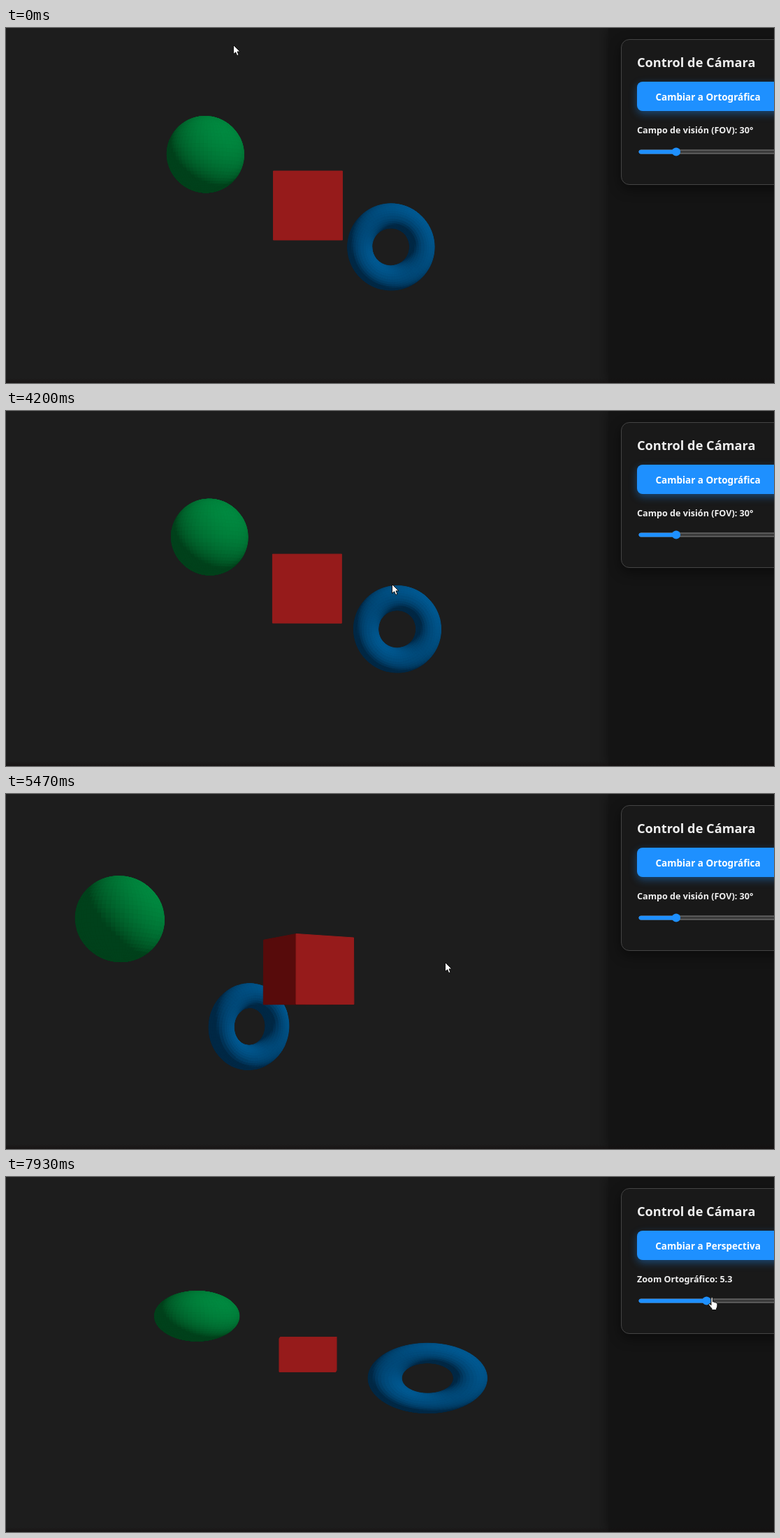
An HTML page with a canvas for the animation above (8000 ms loop, 1099x509 px).

```html
<!DOCTYPE html>
<html lang="es">
<head>
<meta charset="utf-8">
<title>Control de Cámara</title>
<style>
  html, body { margin: 0; width: 100%; height: 100%; overflow: hidden; background: #1d1d1d; }
  #stage { position: absolute; inset: 0; overflow: hidden; contain: strict; }
  #stage * { box-sizing: border-box; }
  #stage > * { position: absolute; }
  canvas, svg { left: 0; top: 0; }
  #edge { left: 0; right: 0; bottom: 0; height: 7px; background: linear-gradient(#0000, #150f0f99); }
  #side { left: 862px; right: 0; top: 0; bottom: 0; background: #141414; box-shadow: 0 0 18px #0008; }
  #card { left: 880px; right: -40px; top: 16px; height: 209px; background: #191919;
    border: 1px solid #444; border-radius: 12px; box-shadow: 0 6px 18px #0007; }
  #button { left: 903px; right: -20px; top: 77px; height: 42px; border-radius: 8px;
    box-shadow: 0 4px 12px #1e90ff66; outline: 0 solid #fff; outline-offset: -1px; }
  text { font-family: "Noto Sans", "Open Sans", sans-serif; font-weight: 700; fill: #f0f0f0; }
</style>
</head>
<body>
<div id="stage">
  <canvas id="scene" width="864" height="509"></canvas>
  <div id="side"></div>
  <div id="card"></div>
  <div id="button"></div>
  <div id="edge"></div>
  <svg width="1099" height="509">
    <text x="903" y="56" font-size="18.2">Control de Cámara</text>
    <text id="action" x="1004.5" y="103.5" font-size="13.5" text-anchor="middle" style="fill:#fff"></text>
    <text id="label" x="903" y="150.5" font-size="12.6"></text>
    <rect x="906" y="175" width="230" height="5" rx="2.5" fill="#3b3b3b" stroke="#858585"/>
    <rect id="fill" x="905.5" y="174.8" height="5.6" rx="2.8" fill="#1e90ff"/>
    <circle id="thumb" cy="177.5" r="6.1" fill="#1e90ff"/>
    <g id="cursor" fill="#fff" stroke="#111" stroke-linejoin="round">
      <path id="arrow" d="M.5 .5V13.6L3.6 10.8 5.7 15.6 8 14.6 6 9.9H10Z"/>
      <path id="hand" d="M4 10.5V2Q4 .6 5.2 .6T6.4 2V7Q8.4 6.2 8.7 7.7 10.6 7 10.9 8.5 12.8 8 12.9 9.8V13
        Q12.8 15 11.6 16.4V18.6H5V16.6Q3.4 15.2 .8 11.2 .4 9.8 1.6 9.7 2.6 9.7 4 11.7Z"/>
    </g>
  </svg>
</div>
<script>
const $ = id => document.getElementById(id);
const ctx = $('scene').getContext('2d');
const LOOP = 8000, STEP = 1000 / 15, CX = 432, CY = 254.5, DISTANCE = 10;
const FOCAL = CY / Math.tan(Math.PI / 12), ORTHO_X = 864 / 10.6, ORTHO_Y = 509 / 10.6;
const INSET = .005; // makes room for the strokes that close the seams
const { sin, cos, PI } = Math;
const dot = (a, b) => a[0] * b[0] + a[1] * b[1] + a[2] * b[2];

// Lambert shading in linear light: ambient plus one light from (1, 1, 1)
function shade(rgb, normal) {
  const light = (.3 + 1.13 * Math.max(0, dot(normal, [1, 1, 1]) / Math.sqrt(3))) / PI;
  return `rgb(${rgb.map(c => {
    const v = ((c / 255 + .055) / 1.055) ** 2.4 * light * (c > 0);
    return 255 * (v < .0031308 ? 12.92 * v : 1.055 * v ** (1 / 2.4) - .055);
  })})`;
}

// surface(u, v) gives a local point and its normal, for u and v from 0 to 1
function patch(center, rgb, nu, nv, surface) {
  const quads = [], at = p => p.map((c, k) => c + center[k]);
  for (let i = 0; i < nu; i++) for (let j = 0; j < nv; j++) {
    const sample = (di, dj) => surface((i + di) / nu, (j + dj) / nv);
    const [mid, normal] = sample(.5, .5);
    quads.push({ mid: at(mid), normal, color: shade(rgb, normal),
      corners: [[0, 0], [1, 0], [1, 1], [0, 1]].map(d => at(sample(...d)[0])) });
  }
  return quads;
}

function sphere(center, rgb, radius) {
  return { center, quads: patch(center, rgb, 64, 32, (u, v) => {
    const a = u * 2 * PI, b = v * PI, n = [sin(b) * cos(a), cos(b), sin(b) * sin(a)];
    return [n.map(c => c * (radius - INSET)), n];
  }) };
}

function torus(center, rgb, radius, tube) {
  return { center, quads: patch(center, rgb, 80, 32, (u, v) => {
    const a = u * 2 * PI, b = v * 2 * PI, t = tube - INSET, r = radius + t * cos(b);
    return [[r * cos(a), r * sin(a), t * sin(b)], [cos(b) * cos(a), cos(b) * sin(a), sin(b)]];
  }) };
}

function cube(center, rgb, size) {
  const half = size / 2 - INSET;
  const face = (axis, side) => patch(center, rgb, 1, 1, (u, v) => {
    const place = (w, p, q) => [0, 1, 2].map(k => k === axis ? w : k === (axis + 1) % 3 ? p : q);
    return [place(side * half, (2 * u - 1) * half, (2 * v - 1) * half), place(side, 0, 0)];
  });
  return { center, quads: [0, 1, 2].flatMap(axis => [...face(axis, -1), ...face(axis, 1)]) };
}

const bodies = [
  sphere([-2, 1, -3], [0, 196, 94], .75),
  cube([0, 0, 0], [255, 53, 53], 1),
  torus([2, -1, -6], [0, 129, 208], .75, .3),
];

function drawScene(ortho, [azimuth, elevation]) {
  const sa = sin(azimuth), ca = cos(azimuth), se = sin(elevation), ce = cos(elevation);
  const toCamera = [sa * ce, se, ca * ce], near = p => dot(p, toCamera);
  const project = p => {
    const x = p[0] * ca - p[2] * sa, y = p[1] * ce - (p[0] * sa + p[2] * ca) * se;
    const scale = FOCAL / (DISTANCE - near(p));
    return [CX + x * (ortho ? ORTHO_X : scale), CY - y * (ortho ? ORTHO_Y : scale)];
  };
  const faces = q => near(q.normal) * DISTANCE - (ortho ? 0 : dot(q.normal, q.mid)) > 0;
  const byDepth = key => (a, b) => near(a[key]) - near(b[key]);

  ctx.fillStyle = '#1d1d1d';
  ctx.fillRect(0, 0, 864, 509);
  ctx.lineJoin = 'round';
  for (const body of bodies.sort(byDepth('center')))
    for (const quad of body.quads.filter(faces).sort(byDepth('mid'))) {
      ctx.fillStyle = ctx.strokeStyle = quad.color;
      ctx.beginPath();
      quad.corners.forEach(p => ctx.lineTo(...project(p)));
      ctx.closePath();
      ctx.fill();
      ctx.stroke();
    }
}

const within = (t, from, to) => t >= from && t < to;

function ease(t, from, to) {
  const s = Math.min(1, Math.max(0, (t - from) / (to - from)));
  return s ** 3 * (10 - 15 * s + 6 * s * s);
}

// Each drag swings the camera out and then back
function perspectiveOrbit(t) {
  const out = ease(t, 4070, 4860), back = ease(t, 4860, 5640);
  return [.71 * out - 1.36 * back, .104 * out - .172 * back];
}
function orthoOrbit(t) {
  const out = ease(t, 6600, 7060), back = ease(t, 7060, 7500);
  return [.52 * out - .503 * back, .155 * out - .106 * back];
}

// Pointer moves: start, end, x, y
const moves = [
  [66, 67, 846, 36], [900, 901, 1029, 93], [1000, 1200, 957, 114], [2860, 2861, 953, 117],
  [3330, 3530, 1000, 93], [3670, 4150, 552, 248], [4200, 4670, 500, 258], [4670, 5400, 628, 241],
  [5667, 6200, 995, 86], [6330, 6600, 550, 228], [6650, 6930, 500, 244], [6930, 7400, 561, 231],
  [7450, 7920, 1005, 172],
];
const pointer = t => moves.reduce(([x, y], [from, to, nx, ny]) => {
  const s = ease(t, from, to);
  return [x + (nx - x) * s, y + (ny - y) * s];
}, [325, 24]);

function render(t) {
  const ortho = within(t, 2260, 3660) || t >= 6260;
  drawScene(ortho, ortho ? orthoOrbit(t) : perspectiveOrbit(t));

  $('action').textContent = ortho ? 'Cambiar a Perspectiva' : 'Cambiar a Ortográfica';
  $('label').textContent = ortho ? 'Zoom Ortográfico: 5.3' : 'Campo de visión (FOV): 30°';
  const thumb = ortho ? 1002.5 : 959;
  $('thumb').setAttribute('cx', thumb);
  $('fill').setAttribute('width', thumb - 905.5);

  const hover = ease(t, 400, 800) - ease(t, 3730, 4000) + ease(t, 5930, 6200) - ease(t, 6330, 6600);
  const focused = within(t, 2260, 4060) || within(t, 6260, 6600);
  $('button').style.background = `rgb(${30 - 2 * hover}, ${144 - 10 * hover}, ${255 - 17 * hover})`;
  $('button').style.outlineWidth = focused ? '2px' : 0;

  const [x, y] = pointer(t), hand = x > 900;
  const hidden = within(t, 130, 995) || within(t, 2060, 2260);
  $('cursor').setAttribute('transform', `translate(${Math.round(x)} ${Math.round(y)})`);
  $('cursor').style.display = hidden ? 'none' : '';
  $('arrow').style.display = hand ? 'none' : '';
  $('hand').style.display = hand ? '' : 'none';
}

let shown = -1;
function tick() {
  const step = Math.floor((performance.now() % LOOP + 5) / STEP) % 120;
  if (step !== shown) render((shown = step) * STEP);
  requestAnimationFrame(tick);
}
tick();
</script>
</body>
</html>
```
